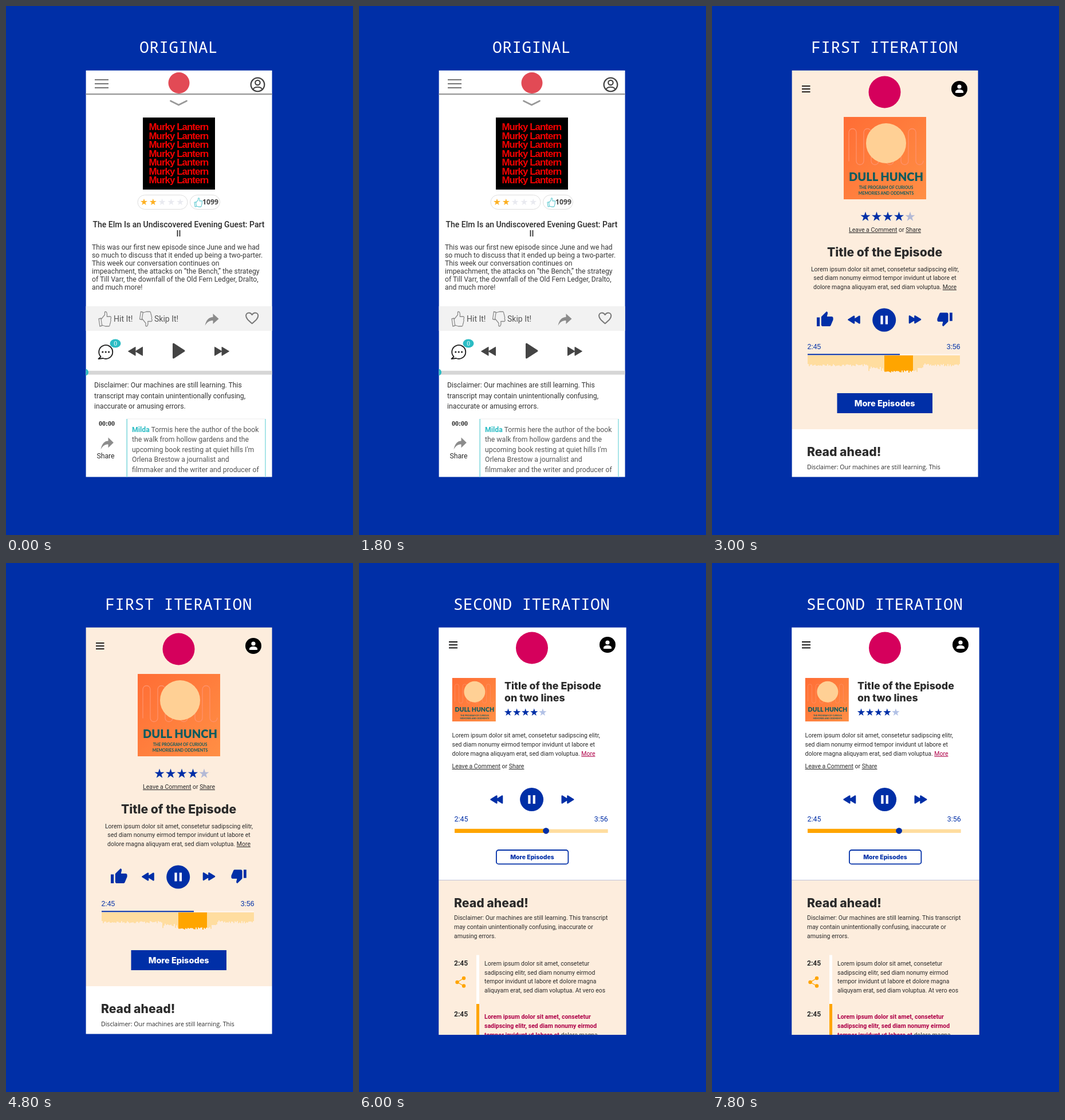
Animation, 606 px wide and 925 px high, one loop 9 s. Source, as an HTML page:

```html
<!DOCTYPE html>
<html lang="en">
<head>
<meta charset="utf-8">
<title>Design iterations</title>
<style>
  html, body { margin: 0; width: 100%; height: 100%; overflow: hidden; background: #002fa7; }
  svg { display: block; width: 606px; height: 925px; font-family: Roboto, sans-serif; }
  .mono { font: 500 28px "Noto Sans Mono", monospace; letter-spacing: .3px; fill: #fff; }
  .head { font-family: Inter, sans-serif; font-weight: 800; }
  .mid { text-anchor: middle; }
  .end { text-anchor: end; }
  .u { text-decoration: underline; }
  .b { font-weight: 700; }
  .line { fill: none; stroke-linecap: round; stroke-linejoin: round; }
</style>
</head>
<body>
<svg viewBox="0 0 606 925"></svg>
<script>
const BLUE = '#002fa7', CREAM = '#fdeddd', ORANGE = '#ffa500', PALE = '#ffdd9f',
      INK = '#2b2b2b', TEAL = '#2bbcc4', CRIMSON = '#ae0048', PINK = '#d5005c', GREY = '#8c8c8c';

const text = (x, y, size, str, fill = INK, attrs = '') =>
  `<text x="${x}" y="${y}" font-size="${size}" fill="${fill}" ${attrs}>${str}</text>`;
const lines = (x, y, step, size, rows, fill, attrs) =>
  rows.map((row, i) => text(x, y + i * step, size, row, fill, attrs)).join('');
const rect = (x, y, w, h, fill, attrs = '') =>
  `<rect x="${x}" y="${y}" width="${w}" height="${h}" fill="${fill}" ${attrs}/>`;
const circle = (x, y, r, fill, attrs = '') =>
  `<circle cx="${x}" cy="${y}" r="${r}" fill="${fill}" ${attrs}/>`;
const path = (d, fill, attrs = '') => `<path d="${d}" fill="${fill}" ${attrs}/>`;
const stroke = (d, color, width, attrs = '') =>
  `<path class="line" d="${d}" stroke="${color}" stroke-width="${width}" ${attrs}/>`;
const at = (x, y, body, sx = 1, sy = sx) =>
  `<g transform="translate(${x} ${y}) scale(${sx} ${sy})">${body}</g>`;
const link = (str, attrs = '') => `<tspan class="u" ${attrs}>${str}</tspan>`;

const HEAD = 'class="head"', HEAD_MID = 'class="head mid"', MID = 'class="mid"';
const HAND = 'M0 13l4-1 2 13-4 1zM5 13l6-7V1c3-2 5 2 4 8h6c2 0 2 3 1 4s1 2 0 4 0 3-1 4 0 4-2 5h-7l-6-2';
const THUMB = 'M1 21h4V9H1zM23 10c0-1.1-.9-2-2-2h-6.3l1-4.6c.1-.6-.1-1-.4-1.4L14.2 1 7.6 7.6C7.2 8 7 8.5 7 9v10c0 1.1.9 2 2 2h9c.8 0 1.5-.5 1.8-1.2l3-7.1c.1-.2.2-.4.2-.7z';
const ARROW = 'M0 21C2 11 7 6 14 6V0l10 9-10 9v-6C8 12 4 14 0 21z';
const HEART = 'M12 20.5C5 14.5 2 11.5 2 7.6 2 4.8 4.2 2.8 6.8 2.8c2 0 4 1.2 5.2 3.2 1.2-2 3.2-3.2 5.2-3.2C19.8 2.8 22 4.8 22 7.6c0 3.9-3 6.9-10 12.9z';

function star(x, y, r, fill) {
  const points = Array.from({ length: 10 }, (_, i) => {
    const a = i * Math.PI / 5, d = i % 2 ? r * .39 : r;
    return (x + d * Math.sin(a)).toFixed(2) + ',' + (y - d * Math.cos(a)).toFixed(2);
  });
  return `<polygon points="${points.join(' ')}" fill="${fill}"/>`;
}
const stars = (x, y, step, r, score, on, off) =>
  [0, 1, 2, 3, 4].map(i => star(x + i * step, y, r, i < score ? on : off)).join('');

const menu = (x, y, w, step, color, width) =>
  [0, 1, 2].map(i => rect(x, y + i * step - width / 2, w, width, color)).join('');
const skip = (x, y, dir, color, w, h, round) => at(x, y,
  path(`M${-w} ${-h}L0 0 ${-w} ${h}zM0 ${-h}L${w} 0 0 ${h}z`, color,
    `stroke="${color}" stroke-width="${round}" stroke-linejoin="round"`), dir, 1);
const pause = (x, y) => circle(x, y, 20.5, BLUE) +
  rect(x - 6.3, y - 7.5, 4.2, 15, '#fff') + rect(x + 2.1, y - 7.5, 4.2, 15, '#fff');
const profile = (x, y) => circle(x, y, 14, '#000') + circle(x, y - 4, 3.6, '#fff') +
  path(`M${x - 7} ${y + 7}v-2c0-2.6 4-4 7-4s7 1.4 7 4v2z`, '#fff');
const button = (label, x, y, size, fill) => text(x, y, size, label, fill, HEAD_MID);

function cover(x, y, scale) {
  const wave = 'v-50a6.5 6.5 0 0 1 13 0v50a6.5 6.5 0 0 0 13 0'.repeat(5);
  return at(x, y,
    rect(0, 0, 144, 144, 'url(#warm)') +
    stroke('M9 77' + wave, '#ff916a', 1.3) +
    circle(74, 46, 35, '#ffd095') +
    text(74, 112, 20, 'DULL HUNCH', '#0a5c60', 'class="mid" font-family="Lato, sans-serif" font-weight="900"') +
    lines(74, 126, 9.6, 7, ['THE PROGRAM OF CURIOUS', 'MEMORIES AND ODDMENTS'], '#0a5c60',
      'class="mid" font-family="Lato, sans-serif" font-weight="700"'), scale);
}

function waveform() {
  let seed = 7;
  const random = () => (seed = seed * 16807 % 2147483647) / 2147483647;
  let out = '';
  for (let x = 167; x < 433; x += 2) {
    const r = random(), active = x >= 301 && x < 350;
    const depth = active ? 26 + 4 * r : x < 272 ? 15 + 4 * r : x < 301 ? 18 + 10 * r
      : x < 358 ? 25 + 4 * r : x < 375 ? 14 + 9 * r : 15 + 4 * r;
    out += rect(x, 611, 2, depth.toFixed(1), active ? ORANGE : PALE);
  }
  return out;
}

function firstScreen() {
  return rect(139, 112, 327, 713, '#fff') +
    menu(155, 129, 24, 7, '#666', 1.8) +
    circle(302, 134.5, 18.5, '#e24a55') +
    rect(139, 153, 327, 2.2, '#959595') +
    stroke('M287.5 166l14 7 14-7', '#999', 2.8) +
    circle(439.5, 137.5, 11.8, 'none', 'stroke="#444" stroke-width="2.3"') +
    circle(439.5, 134, 4.2, 'none', 'stroke="#444" stroke-width="2.2"') +
    stroke('M431.5 145.5c3-5 13-5 16 0', '#444', 2.2) +
    rect(239, 195, 126, 126, '#000') +
    lines(301.5, 217, 15.5, 16.8, Array(7).fill('Murky Lantern'), '#f50000',
      'class="mid b" font-family="Liberation Sans, sans-serif" letter-spacing="-.9"') +
    rect(230, 330.5, 87, 25, '#fff', 'rx="12.5" stroke="#ddd"') +
    stars(241, 343, 15.8, 6.3, 2, '#fdb022', '#e9eaf0') +
    rect(321.5, 330.5, 52, 25, '#fff', 'rx="12.5" stroke="#ddd"') +
    at(329, 335.5, stroke(HAND, '#5cc8cf', 1.8), .6) +
    text(343, 347.3, 12.2, '1099', '#444', 'class="b" font-family="Noto Sans, sans-serif"') +
    lines(301.5, 387, 15.7, 14, ['The Elm Is an Undiscovered Evening Guest: Part', 'II'], INK, 'class="mid" font-weight="500"') +
    lines(150, 425.5, 14, 12.25, [
      'This was our first new episode since June and we had',
      'so much to discuss that it ended up being a two-parter.',
      'This week our conversation continues on',
      'impeachment, the attacks on “the Bench,” the strategy',
      'of Till Varr, the downfall of the Old Fern Ledger, Dralto,',
      'and much more!'], '#3a3a3a') +
    rect(139, 525, 327, 43, '#f2f2f2') +
    at(162, 534, stroke(HAND, '#888', 1.3), .95, 1) +
    text(188, 552, 14, 'Hit It!', '#555') +
    at(233.5, 560.5, stroke(HAND, '#888', 1.3), .95, -1) +
    text(259, 552, 14, 'Skip It!', '#555') +
    at(347.5, 538, path(ARROW, GREY)) +
    at(417, 533.5, stroke(HEART, '#777', 1.9), 1.06) +
    stroke('M165.5 613.2a12 12 0 1 1 4 2.8l-8 1z', '#222', 1.9) +
    [168.8, 174.2, 179.6].map(x => circle(x, 605, 1.6, '#222')).join('') +
    `<ellipse cx="191" cy="590" rx="9.5" ry="7.5" fill="${TEAL}"/>` +
    text(191, 594, 11.5, '0', '#fff', 'class="mid" font-family="Liberation Serif, serif"') +
    skip(226, 603.8, -1, '#444', 12.5, 7.5, 1) +
    path('M292.5 591v24l18.5-12z', '#444', 'stroke="#444" stroke-width="3" stroke-linejoin="round"') +
    skip(377, 603.8, 1, '#444', 12.5, 7.5, 1) +
    rect(139, 637.8, 327, 6.8, '#d6d6d6') + circle(138, 640.5, 6, TEAL) +
    lines(154, 667, 18.5, 12.25, [
      'Disclaimer: Our machines are still learning. This',
      'transcript may contain unintentionally confusing,',
      'inaccurate or amusing errors.'], '#333') +
    text(162, 733.5, 12, '00:00', INK, 'class="b" font-family="Liberation Serif, serif"') +
    at(165.5, 754.5, path(ARROW, GREY), .93, 1) +
    text(174, 791, 12.25, 'Share', INK, MID) +
    rect(212, 721.5, 240, 1, '#eee') +
    rect(210.3, 722, 1.8, 102, '#8fdde1') + rect(452, 722, 2, 102, '#a9e5e8') +
    lines(220, 744.5, 17.5, 12.25, [
      `<tspan class="b" fill="${TEAL}">Milda</tspan> Tormis here the author of the book`,
      'the walk from hollow gardens and the',
      'upcoming book resting at quiet hills I\'m',
      'Orlena Brestow a journalist and',
      'filmmaker and the writer and producer of'], '#555');
}

function secondScreen() {
  return rect(139, 112, 327, 628, CREAM) + rect(139, 740, 327, 85, '#fff') +
    menu(157, 140, 14.5, 5.1, '#000', 1.7) +
    circle(301.5, 150.5, 28, PINK) + profile(432, 145) +
    cover(230, 194, 1) +
    stars(268, 368.5, 19.5, 9, 4, BLUE, '#b3b9d5') +
    text(302, 395, 10.5, link('Leave a Comment') + ' or ' + link('Share'), INK, MID) +
    text(301.5, 437.8, 21.2, 'Title of the Episode', INK, HEAD_MID) +
    lines(302, 463.5, 15.7, 10.5, [
      'Lorem ipsum dolor sit amet, consetetur sadipscing elitr,',
      'sed diam nonumy eirmod tempor invidunt ut labore et',
      'dolore magna aliquyam erat, sed diam voluptua. ' + link('More')], INK, MID) +
    at(181.7, 532.7, path(THUMB, BLUE), 1.3) + at(421, 561.5, path(THUMB, BLUE), -1.2) +
    skip(248, 548.5, -1, BLUE, 9.5, 5.8, 2.6) + pause(300.7, 549) + skip(354.5, 548.2, 1, BLUE, 9.5, 5.8, 2.6) +
    text(166.5, 600, 12.2, '2:45', BLUE, 'font-family="Liberation Sans, sans-serif"') +
    text(433.5, 600, 12.2, '3:56', BLUE, 'class="end" font-family="Liberation Sans, sans-serif"') +
    rect(328, 608.5, 105, 1.8, '#fff6ed') + rect(167, 608.3, 161, 2, BLUE) +
    waveform() +
    rect(218.5, 677, 166.5, 35, BLUE) + button('More Episodes', 301.7, 700, 14.5, '#fff') +
    text(166, 787, 21.1, 'Read ahead!', INK, HEAD) +
    text(166, 809.7, 10.55, 'Disclaimer: Our machines are still learning. This', INK, 'font-family="Open Sans, sans-serif"');
}

function thirdScreen() {
  return rect(139, 112, 328, 442.5, '#fff') + rect(139, 554.5, 328, 271, CREAM) +
    menu(157, 138, 15, 5.2, '#000', 1.8) +
    circle(302, 148.5, 28, PINK) + profile(434, 143) +
    cover(162.8, 201, .528) +
    lines(254, 220.7, 21, 17.8, ['Title of the Episode', 'on two lines'], INK, HEAD) +
    stars(260.5, 261.3, 15.1, 7, 4, BLUE, '#b2c1e6') +
    lines(162.5, 304.7, 16, 10.5, [
      'Lorem ipsum dolor sit amet, consetetur sadipscing elitr,',
      'sed diam nonumy eirmod tempor invidunt ut labore et',
      'dolore magna aliquyam erat, sed diam voluptua. ' + link('More', `fill="${CRIMSON}"`)]) +
    text(162.5, 359, 10.5, link('Leave a Comment') + ' or ' + link('Share')) +
    skip(240.3, 413.5, -1, BLUE, 9.7, 6, 2.6) + pause(301.6, 413.5) + skip(364.5, 413.5, 1, BLUE, 9.7, 6, 2.6) +
    text(166.5, 452.3, 12.4, '2:45', BLUE) + text(434.7, 452.3, 12.4, '3:56', BLUE, 'class="end"') +
    rect(327, 465.5, 107.7, 6.4, PALE) + rect(167, 464.8, 160, 7.2, ORANGE) + circle(326.6, 468.3, 5.4, BLUE) +
    rect(239.9, 502, 125.5, 24.4, '#fff', `rx="4" stroke="${BLUE}" stroke-width="1.8"`) +
    button('More Episodes', 302.5, 517.8, 10.5, BLUE) +
    text(166, 602.3, 21.2, 'Read ahead!', INK, HEAD) +
    lines(166, 624, 15.9, 10.5, [
      'Disclaimer: Our machines are still learning. This transcript',
      'may contain unintentionally confusing, inaccurate or',
      'amusing errors.']) +
    [704, 792.5].map(y => text(166, y, 12.1, '2:45', INK, 'class="b"')).join('') +
    stroke('M183 726l-11.5 7 11.5 6.5', ORANGE, 1.3) +
    circle(183, 726, 3.2, ORANGE) + circle(171.5, 733, 3.2, ORANGE) + circle(183, 739.5, 3.2, ORANGE) +
    rect(205, 685.5, 5, 85.5, '#fff') + rect(205, 771, 5, 54, ORANGE) +
    lines(219, 703.7, 15.8, 10.5, [
      'Lorem ipsum dolor sit amet, consetetur',
      'sadipscing elitr, sed diam nonumy eirmod',
      'tempor invidunt ut labore et dolore magna',
      'aliquyam erat, sed diam voluptua. At vero eos']) +
    lines(219, 796.8, 15.9, 10.5, [
      'Lorem ipsum dolor sit amet, consetetur',
      'sadipscing elitr, sed diam nonumy eirmod',
      `tempor invidunt ut labore et <tspan font-weight="400" fill="${INK}">dolore magna</tspan>`], CRIMSON, 'class="b"');
}

const screen = (title, body, clip) =>
  `<g class="screen"><text class="mono mid" x="301.5" y="82">${title}</text><g clip-path="url(#${clip})">${body}</g></g>`;

document.querySelector('svg').innerHTML = `<defs>
  <linearGradient id="warm" x2="1" y2="1"><stop stop-color="#ff6d35"/><stop offset="1" stop-color="#ff8f45"/></linearGradient>
  <clipPath id="card">${rect(139.6, 112.7, 325, 710.7, '#000')}</clipPath>
  <clipPath id="wide">${rect(139.2, 112.7, 327.5, 712.2, '#000')}</clipPath></defs>` +
  rect(0, 0, 606, 925, BLUE) +
  screen('ORIGINAL', firstScreen(), 'card') +
  screen('FIRST ITERATION', secondScreen(), 'card') +
  screen('SECOND ITERATION', thirdScreen(), 'wide');

const screens = document.querySelectorAll('.screen');
function draw() {
  const current = Math.floor(performance.now() % 9000 / 3000);
  screens.forEach((el, i) => el.style.display = i === current ? '' : 'none');
  requestAnimationFrame(draw);
}
draw();
</script>
</body>
</html>
```
